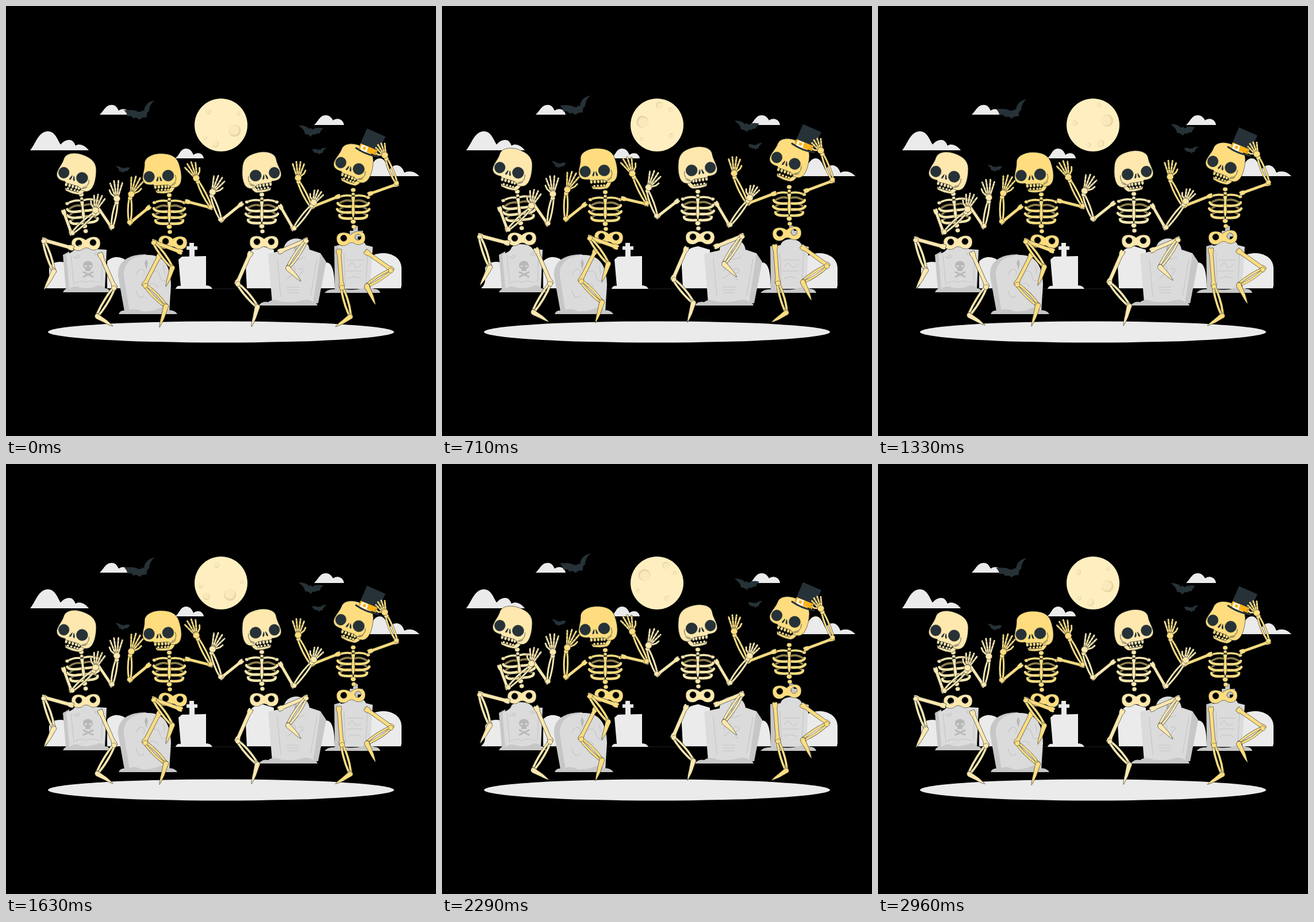
Write an HTML page that moves like this. It is 748x748 px and loops after 3000 ms.

```html
<!DOCTYPE html>
<html lang="en">
<head>
<meta charset="utf-8">
<title>Skeleton dance</title>
<style>
html, body { margin: 0; width: 100%; height: 100%; overflow: hidden; background: #000; }
svg { display: block; width: 100vw; height: 100vh; }
path { stroke-linecap: round; stroke-linejoin: round; }
</style>
</head>
<body>
<svg viewBox="0 0 748 748">
  <g fill="#ebebeb">
    <path d="M42 251C51 241 56 218 73 218C86 218 90 234 95 241C100 235 105 233 110 233C116 233 119 238 121 243C128 238 138 243 144 251Z"/>
    <path d="M163 189C170 183 173 172 184 172C191 172 194 178 196 182C203 177 213 179 215 189Z"/>
    <path d="M294 265C302 260 303 248 313 248C321 248 324 254 326 259C333 253 343 256 344 265Z"/>
    <path d="M536 207C543 201 546 190 556 190C563 190 567 195 569 199C576 193 587 197 588 207Z"/>
    <path d="M622 296C632 287 638 265 650 265C660 265 663 279 667 285C674 273 688 274 693 290C702 285 713 289 719 296Z"/>
  </g>
  <g id="moon">
    <circle cx="374" cy="207" r="46" fill="#ffefc0"/>
    <g id="craters"></g>
  </g>
  <path d="M73 492H688" stroke="#263238" stroke-width=".7"/>
  <ellipse cx="374" cy="567" rx="301" ry="18.5" fill="#ebebeb"/>
  <g id="graves">
    <g fill="#ebebeb">
      <path d="M68 491Q74 486 75 478V456C80 443 98 442 112 450V491Z"/>
      <path d="M176 491V444C187 433 203 435 213 447V491Z"/>
      <path d="M319 437V424H314V418H319V412H327V418H333V424H328V437Z"/>
      <path d="M300 441L306 436L348 435V486Q356 486 359 492H295Q297 486 304 487Z"/>
      <path d="M419 491L417 452C417 430 428 420 446 418L466 424V491Z"/>
      <path d="M542 491L556 446C567 446 571 458 572 491Z"/>
      <path d="M634 491V436C650 425 687 428 688 456V486L687 491Z"/>
    </g>
    <g fill="#c7c7c7">
      <path d="M99 433L110 427L114 492H104Z"/>
      <path d="M195 470C193 444 213 432 243 432L255 440L226 531H206Z"/>
      <path d="M529 424L547 430L557 445L543 517H530Z"/>
      <path d="M571 418L582 415L584 492H572Z"/>
      <path d="M604 404V400H598V391H604V383Q608 381 612 383V391H621V401H612V406Z"/>
    </g>
    <g fill="#dbdbdb">
      <path d="M105 432Q119 428 121 420C128 412 151 412 158 423L175 424L172 492H110Z"/>
      <path d="M205 470C203 447 220 434 247 433C274 433 286 451 287 485L284 532H215Z"/>
      <path d="M456 431L483 425C484 398 525 398 528 424L547 431L534 517H463Z"/>
      <path d="M578 418L589 416C592 402 621 402 626 416L638 419L633 492H580Z"/>
    </g>
    <g fill="#c7c7c7">
      <path d="M99 498Q103 490 111 492Q120 484 130 490Q144 493 158 487Q168 484 172 491Q179 491 181 498Z"/>
      <path d="M196 536Q199 528 210 530Q224 524 236 531Q254 532 266 526Q276 522 283 529Q294 529 298 536Z"/>
      <path d="M440 521Q445 513 456 515Q466 508 478 514Q498 517 515 512Q528 509 534 515Q540 515 542 521Z"/>
      <path d="M554 499Q560 492 570 493Q580 488 592 493Q610 495 622 490Q634 487 640 492Q649 492 651 499Z"/>
    </g>
    <g fill="none" stroke="#c4c4c4" stroke-width="1.1">
      <path d="M113 434L118 484M168 431L166 482M117 436q8 6 11-1q-5-4-6 2M165 431q-8 6-11 0q5-4 6 2M120 482q10-6 18-1q10-5 24 0"/>
      <path d="M226 468C232 450 246 460 239 468M254 462q12-4 14 8t11 6M246 487q12-10 18 2M226 495q5 18 14 9M274 452l2 14"/>
      <path d="M472 440L478 505M541 440L530 503M491 461c0-12 13-11 12-2s-11 12-14 15M509 458c8-5 11 5 3 7q-5 9 3 12M488 489H510M489 494H509M490 499H508M493 437Q506 445 520 436"/>
      <path d="M588 430L590 486M629 429L626 484M593 442H622M592 461H620M596 453q6-10 10-2t12-1M595 474q10-6 22 0"/>
    </g>
    <g fill="#b8b8b8" stroke="#b8b8b8" stroke-width="3">
      <path d="M135 463L151 471M151 463L135 471"/>
      <path stroke="none" d="M134 451C134 441 151 441 151 451Q151 456 147 457V461H138V457Q134 456 134 451Z"/>
      <path stroke="none" fill="#dbdbdb" d="M137 451h3.5v3h-3.5zM145 451h3.5v3h-3.5z"/>
      <path stroke="none" d="M241 447l3-7l3 7l-3 12zM501 422l3-8l3 8l-3 12z"/>
    </g>
  </g>
  <g id="bats" fill="#263238">
    <path d="M259 164C248 166 241 172 240 183L237 181L235 184L230 184C223 180 215 181 205 181C209 185 211 188 211 192C216 190 220 192 222 196C226 193 230 195 232 198C236 194 240 193 245 194C244 188 246 184 249 183C249 175 253 168 259 164Z"/>
    <path id="bat" d="M509 208C516 207 523 209 527 214L530 212L533 215C539 211 545 211 552 213C548 216 546 219 546 222C542 221 540 222 538 224C535 222 531 225 530 228C527 223 523 223 520 223C520 217 515 212 509 208Z"/>
    <use href="#bat" transform="translate(545 252) scale(-.6 .6) translate(-530 -217)"/>
    <use href="#bat" transform="translate(203 284) scale(.6) translate(-530 -217)"/>
  </g>
  <g id="dancers"></g>
</svg>
<script>
const DARK = '#263238', LIGHT = '#ffe8ad', GOLD = '#ffdd7e';
const $ = id => document.getElementById(id);

// Limbs run joint to joint; each point is its lowest position.
const DANCERS = [
  { tone: GOLD, chest: [604, 330, 0], pelvis: [600, 404, -4], face: [598, 278, 19.7, 1], hat: true,
    arms: [[[579, 331], [531, 350], [508, 304], [509, 271], 1], [[632, 327], [680, 310], [661, 264], [650, 240], -1]],
    legs: [[[579, 426], [584, 488], [599, 540], [573, 558]], [[627, 428], [671, 459], [627, 487], [643, 520]]] },
  { tone: LIGHT, chest: [132, 338, -6], pelvis: [139, 413, -2], face: [116.5, 294.5, 16, 1],
    arms: [[[157, 346], [184, 386], [193, 340], [192, 304], -1], [[100, 357], [114, 396], [154, 360], [164, 329], -1]],
    legs: [[[164, 432], [189, 489], [158, 540], [186, 557]], [[115, 421], [65, 407], [83, 461], [66, 494]]] },
  { tone: GOLD, chest: [284, 339, 0], pelvis: [290, 411, 3], face: [265.5, 296, -3.5, 1],
    arms: [[[249, 350], [215, 378], [216, 332], [230, 298], 1], [[314, 340], [357, 351], [333, 304], [319, 273], 1]],
    legs: [[[267, 434], [241, 485], [278, 522], [267, 559]], [[304, 428], [256, 410], [289, 455], [278, 488]]] },
  { tone: LIGHT, chest: [445, 338, 0], pelvis: [449, 411, 0], face: [450.5, 292.5, -8.6, -1],
    arms: [[[410, 344], [374, 373], [357, 328], [373, 297], 1], [[477, 348], [500, 388], [533, 346], [546, 322], -1]],
    legs: [[[425, 430], [402, 482], [437, 523], [427, 558]], [[476, 427], [523, 407], [490, 456], [513, 479]]] }
];
// How far each joint lifts, from shoulder to fingertip and from hip to toe.
const ARM_LIFT = [5.5, 6.5, 8.5, 8.8], LEG_LIFT = [9, 8, 7.5, 8];

const tag = (x, y, turn, body, flip = 1) =>
  `<g transform="translate(${x} ${y}) rotate(${turn}) scale(${flip} 1)">${body}</g>`;
const shape = (d, fill, extra = '') => `<path d="${d}" fill="${fill}" stroke="${DARK}" stroke-width=".6" ${extra}/>`;
const rod = (d, width, tone) => [[width + 1, DARK], [width, tone]].map(([w, c]) =>
  `<path d="${d}" fill="none" stroke="${c}" stroke-width="${w}"/>`).join('');
const oval = (x, y, rx, ry, fill) =>
  `<ellipse cx="${x}" cy="${y}" rx="${rx}" ry="${ry}" fill="${fill}" stroke="${DARK}" stroke-width=".5"/>`;

function between([x1, y1], [x2, y2], draw) {
  const turn = Math.atan2(y2 - y1, x2 - x1) * 180 / Math.PI;
  return tag(x1, y1, turn, draw(Math.hypot(x2 - x1, y2 - y1)));
}

const thickBone = (tone, w) => n => {
  const h = w / 2, k = h + 1.2;
  return shape(`M-2 ${-k}Q4 ${-k - 1} 7 ${-h}L${n - 7} ${-h}Q${n - 3} ${-k - 1} ${n + 2} ${-k}Q${n + 5} -1 ${n + 1} 0` +
    `Q${n + 5} 2 ${n + 2} ${k}Q${n - 3} ${k + 1} ${n - 7} ${h}L7 ${h}Q4 ${k + 1} -2 ${k}Q-5 2 -2 0Q-5 -2 -2 ${-k}Z`, tone);
};
const twinBone = (tone, w) => n =>
  rod(`M3 -1.5Q${n / 2} ${-w - 2.2} ${n - 3} -1.8`, w, tone) + rod(`M3 1.8Q${n / 2} ${w + 1.6} ${n - 3} 1.8`, w, tone) +
  oval(2, 0, 4.2, 4.5, tone) + oval(n - 2, 0, 3.6, 4, tone);

const hand = (tone, thumb) => n => {
  const s = n / 36;
  let out = '';
  [-20, -7, 6, 19].forEach((deg, i) => {
    const a = deg * Math.PI / 180, reach = (i % 3 ? 27 : 24) * s;
    const x = 9 * s, y = deg * .13;
    const end = `${x + reach * Math.cos(a)} ${y + reach * Math.sin(a)}`;
    out += rod(`M${x} ${y}L${end}`, 2.7, tone) +
      `<path d="M${x} ${y}L${end}" stroke="${DARK}" stroke-width="2.4" stroke-dasharray=".5 6" stroke-dashoffset="-9" style="stroke-linecap:butt"/>`;
  });
  return out + rod(`M7 ${thumb * 3}L${14 * s} ${thumb * 10}L${20 * s} ${thumb * 12.5}`, 2.6, tone) + oval(5, 0, 5.5, 5.8, tone);
};
const foot = tone => n => shape(`M-4 -2Q-2 -6 3 -4.5L${n * .55} -3.5Q${n - 4} -1.5 ${n} 0Q${n - 5} 2 ${n * .5} 2.5L2 4Q-4 4 -4 -2Z`, tone);

function limb(points, lifts, u, tone, w, last) {
  const [a, b, c, d] = points.slice(0, 4).map(([x, y], i) => [x, y - lifts[i] * u]);
  return between(a, b, thickBone(tone, w)) + between(b, c, twinBone(tone, w * .55)) + between(c, d, last);
}

function chest(tone) {
  let out = oval(0, -10, 4.2, 3.6, tone) + oval(0, -3, 3, 2.6, tone);
  for (let i = 0; i < 3; i++)
    out += `<path d="M${-24 + i} ${13 + i * 10}Q-12 ${5 + i * 10} 0 ${10 + i * 10}Q12 ${5 + i * 10} ${24 - i} ${13 + i * 10}" fill="none" stroke="#8c7e4e" stroke-width="3.6"/>`;
  out += oval(0, 45, 4.6, 4, tone) + oval(1, 54, 4, 3.6, tone);
  [27, 28, 24].forEach((half, i) => {
    const y = 13 + i * 10.5;
    for (const s of [-1, 1]) out += rod(`M${s * half} ${y}Q${s * 24} ${y + 7} ${s * 3} ${y + 5.5}`, 4.3, tone);
  });
  for (const s of [-1, 1]) out += rod(`M${s * 26} 3Q${s * 15} -2 ${s * 4} 0`, 3.4, tone) + oval(s * 26, 3, 3.4, 2.8, tone);
  return out + shape('M-3.5 2Q0 0 3.5 2L2 12Q4 28 1.5 36Q0 41 -1.5 36Q-4 28 -2 12Z', tone);
}

const pelvis = tone => shape('M-25 0C-25 -14 -8 -13 0 -6C8 -13 25 -14 25 0C25 11 15 14 8 11Q0 4 -8 11C-15 14 -25 11 -25 0Z' +
  [-12.5, 12.5].map(x => `M${x - 5.5} -1a5.5 5.5 0 1 0 11 0a5.5 5.5 0 1 0 -11 0Z`).join(''), tone, 'fill-rule="evenodd"');

function face(tone, u) {
  const teeth = (y, h, xs) => xs.map(x => shape(`M${x} ${y}h4.4v${h - 2}q-2.2 4 -4.4 0z`, tone)).join('');
  const jaw = shape('M-7 26Q-2 28 5 28Q15 28 18 25Q21 22 22 19L28 20Q26 28 20 31.5Q8 34 -5 31Z', tone) +
    [-4, 2, 8, 13].map(x => shape(`M${x} 28v-3q2 -2 4 0v3z`, tone)).join('');
  return `<g transform="translate(0 ${2 * u - 2})">${jaw}</g>` + teeth(13, 9, [-9, -3, 3, 9, 14]) +
    shape('M-28 2C-27 -8 -23 -14 -23 -24C-22 -34 -8 -40 6 -39C22 -38 32 -33 36 -21C39 -10 41 2 38 12C35 21 27 23 20 20Q17 16 14 16L-9 16L-10 14C-22 15 -28 11 -28 2Z', tone) +
    `<path d="M22 16Q33 12 29 0M19 18Q26 18 29 13" fill="none" stroke="${DARK}" stroke-width=".7"/>` +
    oval(-16.5, 0, 9.3, 9.6, DARK) + oval(16.5, 0, 10, 9.8, DARK) +
    `<path d="M-1 1Q-5 8 -3.5 8.5Q-1 9 -1 1ZM2 1Q6 8 4.5 8.5Q2 9 2 1Z" fill="${DARK}" stroke="${DARK}"/>`;
}

const HAT = `<path d="M628 213L660 227L646 258L614 245Z" fill="${DARK}"/>
  <path d="M617 239L646 251L644 260L613 248Z" fill="#ffb31a"/>
  <path d="M619 241L630 245L627 255L616 250Z" fill="#fff"/><path d="M622 244L627 246L625 251L620 249Z" fill="#ffb31a"/>
  <path d="M609 247Q626 259 647 262" fill="none" stroke="${DARK}" stroke-width="3"/>`;

function dancer(p, u) {
  const t = p.tone, [cx, cy, ca] = p.chest, [px, py, pa] = p.pelvis, [fx, fy, fa, flip] = p.face;
  return tag(cx, cy - 5.5 * u, ca, chest(t)) + tag(px, py - 9 * u, pa, pelvis(t)) +
    p.legs.map(leg => limb(leg, LEG_LIFT, u, t, 6.4, foot(t))).join('') +
    tag(fx, fy - 9.5 * u, fa, face(t, u), flip) + (p.hat ? tag(0, -8 * u, 0, HAT) : '') +
    p.arms.map(arm => limb(arm, ARM_LIFT, u, t, 5.2, hand(t, arm[4]))).join('');
}

$('craters').innerHTML = [[398, 217, 10.5], [352, 184, 4.8], [404, 187, 3.6], [346, 229, 3.8], [364, 240, 6.2]].map(([x, y, r]) =>
  `<circle cx="${x}" cy="${y}" r="${r}" fill="#e8d8a6"/><circle cx="${x - r * .12}" cy="${y - r * .14}" r="${r * .82}" fill="#faeabb"/>`).join('');

const FPS = 24, CYCLE = 36;
let shown = -1;

function draw(step) {
  const phase = step % CYCLE / CYCLE;
  const lift = 1 - Math.abs(1 - 2 * phase);
  $('craters').setAttribute('transform', `rotate(${360 * phase} 374 207)`);
  $('bats').setAttribute('transform', `translate(0 ${-8.8 * lift})`);
  $('dancers').innerHTML = DANCERS.map(p => dancer(p, lift)).join('');
}

function tick(now) {
  const step = Math.floor((now % 3000 + 5) * FPS / 1000);
  if (step !== shown) draw(shown = step);
  requestAnimationFrame(tick);
}
draw(0);
requestAnimationFrame(tick);
</script>
</body>
</html>
```
